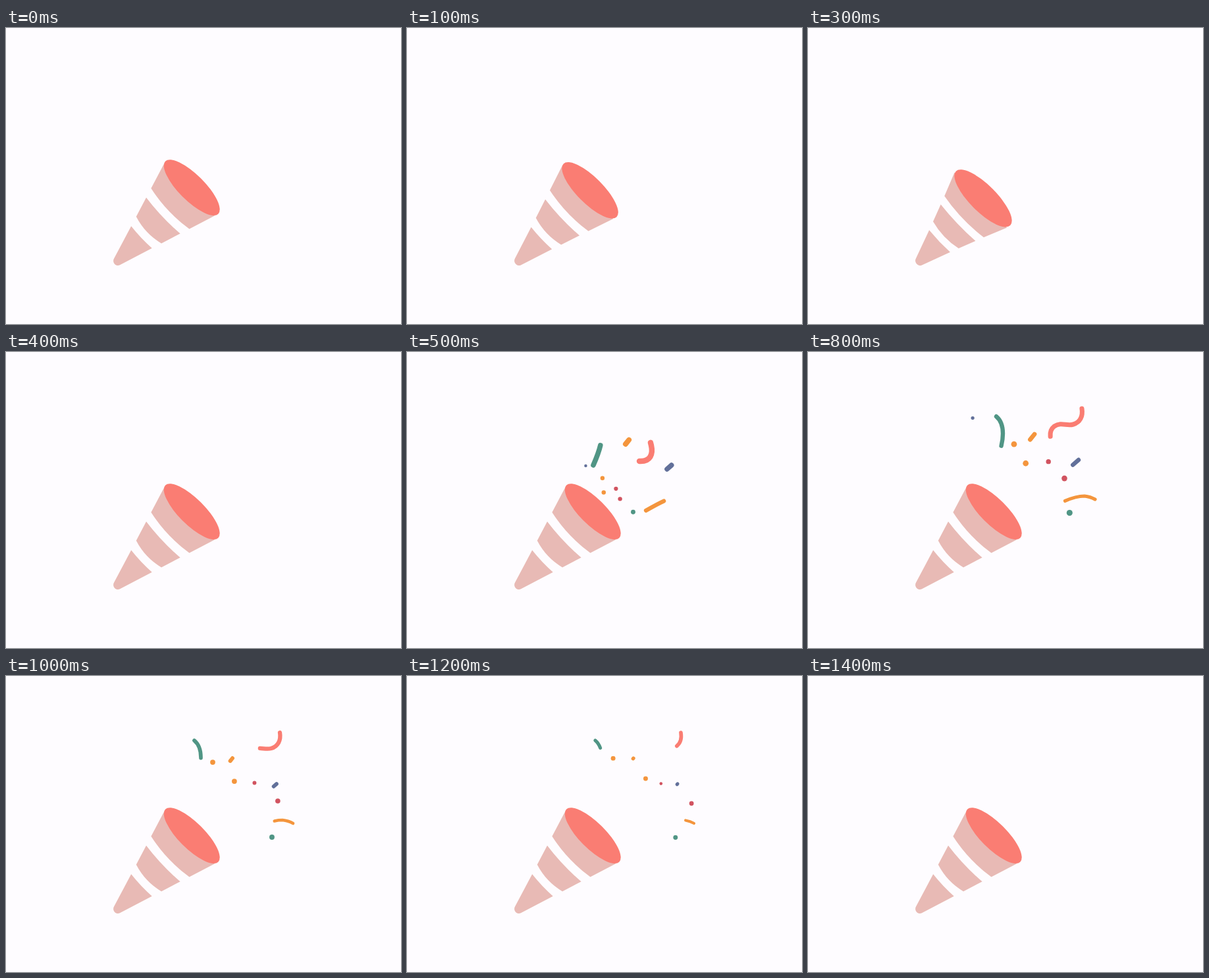
An HTML page for the animation above (1500 ms loop, 600 by 450 pixels).

```html
<!DOCTYPE html>
<html lang="en">
<head>
<meta charset="utf-8">
<title>Party popper</title>
<style>
  html, body { margin: 0; width: 100%; height: 100%; overflow: hidden; background: #fefcff; }
  svg { display: block; width: 600px; height: 450px; }
</style>
</head>
<body>
<svg viewBox="0 0 600 450">
  <path id="cone" fill="#e8bab5"/>
  <ellipse id="rim" fill="#fa7d73"/>
  <g id="confetti" fill="none" stroke-linecap="round"/>
</svg>
<script>
const LOOP = 1500, STEP = 100;
const POP = 400, OUT = 600, GONE = 1400;
const GREEN = '#509585', ORANGE = '#f4953d', RED = '#d15360', BLUE = '#62709a', CORAL = '#fa7d73';

const cone = document.getElementById('cone');
const rim = document.getElementById('rim');
const confetti = document.getElementById('confetti');
const clamp = x => Math.min(1, Math.max(0, x));

function add(tag, attrs) {
  const el = document.createElementNS('http://www.w3.org/2000/svg', tag);
  confetti.append(el);
  return set(el, attrs);
}
function set(el, attrs) {
  for (const key in attrs) el.setAttribute(key, attrs[key]);
  return el;
}

// Ribbons: path, colour, width, share drawn at full burst, speed of the tail
const ribbons = [
  ['M353 166C370 167 374 155 371 142C368 130 365 120 374 113C385 106 393 113 403 110C413 107 418 98 416 86', CORAL, 8.4, .64, 1],
  ['M283 172C291 154 296 139 296 124C296 112 292 103 286 98', GREEN, 7.6, .81, 1],
  ['M363 241C384 229 402 219 420 219Q429 220 436 224', ORANGE, 6.2, .78, 1],
  ['M332 140L344 125', ORANGE, 8, .85, 1.15],
  ['M395 178L411 164', BLUE, 7.6, .84, 1.15]
].map(([d, stroke, width, reach, speed]) =>
  ({ el: add('path', { d, stroke, pathLength: 1 }), width, reach, speed }));

// Dots: colour, radius, shrink, then three points of the flight
const dots = [
  [BLUE, 3.6, .7, 265, 131, 250, 100, 245, 85],
  [ORANGE, 5.2, .4, 306, 161, 313, 140, 314, 131],
  [ORANGE, 5.2, .4, 309, 196, 331, 169, 347, 160],
  [RED, 5, .65, 339, 187, 365.5, 166.5, 377.5, 162.5],
  [RED, 5.1, .4, 349, 212, 390, 192, 413, 190],
  [GREEN, 5.5, .45, 381, 244, 397.5, 244.5, 404, 245]
].map(([fill, r, shrink, ...pts]) => ({ el: add('circle', { fill }), r, shrink, pts }));

// Quadratic through a, b, c at progress 0, .4, .63
function flight(a, b, c, p) {
  const s1 = (b - a) / .4, s2 = (c - b) / .23;
  return a + s1 * p + (s2 - s1) / .63 * p * (p - .4);
}

// Cone coordinates: u along the axis from the tip, v across it
function drawCone(squash) {
  const at = (u, v) => {
    u -= .03 * v;
    v *= 1 + .04 * squash * (u / 160) ** 2;
    u *= 1 - .148 * squash;
    return [166 + (u + v) * Math.SQRT1_2, 358 + (v - u) * Math.SQRT1_2];
  };
  const side = u => 5.3 + .314 * u;
  const band = (low, lowSag, high, highSag) =>
    `M${at(low, -side(low))}L${at(high, -side(high))}` +
    `Q${at(high - 2 * highSag, 0)} ${at(high, side(high))}` +
    `L${at(low, side(low))}Q${at(low - 2 * lowSag, 0)} ${at(low, -side(low))}Z`;
  const tip = `M${at(4, -6.8)}L${at(56.5, -23)}Q${at(54.5, 0)} ${at(56.5, 23)}` +
    `L${at(4, 6.8)}C${at(-3, 5)} ${at(-3, -5)} ${at(4, -6.8)}Z`;
  cone.setAttribute('d', tip + band(72, 4, 103, 2) + band(118, 4, 160, 0));
  const [x, y] = at(163.8 + 1.5 * squash, .6);
  set(rim, { rx: 56.7 + 1.6 * squash, ry: 19.7 + .6 * squash, transform: `translate(${x} ${y}) rotate(45)` });
}

function drawConfetti(t) {
  const visible = t > POP && t < GONE;
  confetti.style.display = visible ? '' : 'none';
  if (!visible) return;
  const burst = clamp((t - POP) / (OUT - POP));
  const p = clamp((t - OUT) / (GONE - OUT)) ** .67;

  for (const { el, width, reach, speed } of ribbons) {
    const head = reach * burst + (1 - reach) * clamp((t - OUT) / 200);
    const tail = clamp(p * speed);
    set(el, {
      'stroke-width': tail < head ? width * (1 - .4 * p) : 0,
      'stroke-dasharray': `${Math.max(0, head - tail)} 2`,
      'stroke-dashoffset': -tail
    });
  }

  const launch = 1 - (1 - burst) ** 1.4;
  for (const { el, r, shrink, pts: [x0, y0, x1, y1, x2, y2] } of dots) {
    const x = flight(x0, x1, x2, p), y = flight(y0, y1, y2, p);
    const faded = r < 4 && t >= 900;
    set(el, {
      cx: 282 + (x - 282) * launch,
      cy: 242 + (y - 242) * launch,
      r: faded ? 0 : r * launch * (1 - shrink * p)
    });
  }
}

function frame() {
  const t = Math.floor(performance.now() % LOOP / STEP) * STEP;
  const x = clamp(t / 300);
  drawCone(t <= 300 ? x * x * (3 - 2 * x) : clamp((POP - t) / 100));
  drawConfetti(t);
  requestAnimationFrame(frame);
}
frame();
</script>
</body>
</html>
```
